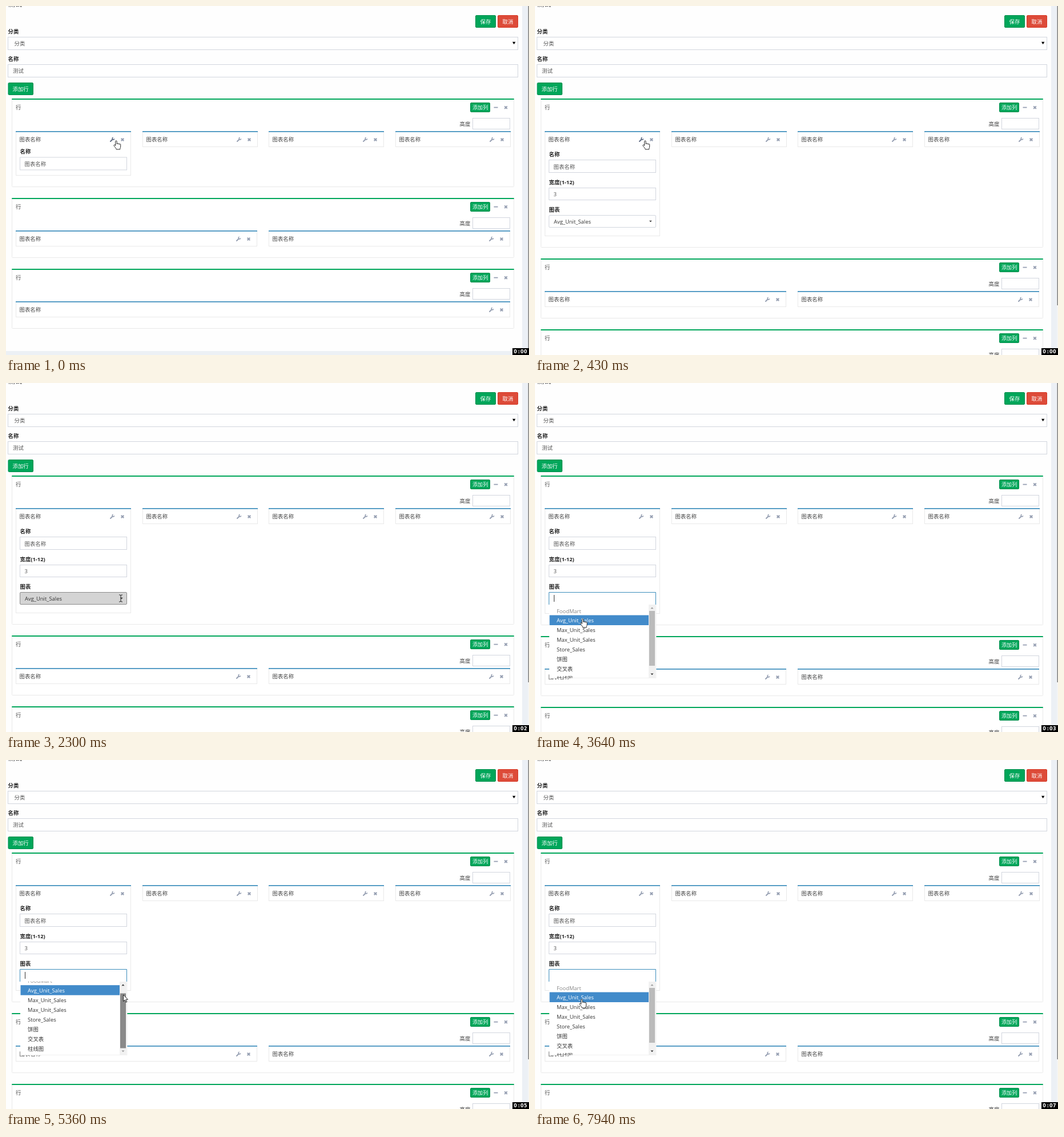
These frames come from a looping animation (916x611 px, 8 s). An HTML page:

```html
<!DOCTYPE html>
<html lang="zh">
<head>
<meta charset="utf-8">
<title>图表布局</title>
<style>
  html, body { margin: 0; width: 100%; height: 100%; overflow: hidden; background: #fff; }
  #stage { display: block; }
  text { font: 9.4px "Open Sans", "Noto Sans CJK SC", "Noto Sans CJK", sans-serif; fill: #444; white-space: pre; }
  .label { font-weight: 700; fill: #222; }
  .value { fill: #555; }
  .item { fill: #333; }
  .muted { fill: #888; }
  .light { fill: #fff; }
  .small { font-size: 9.1px; }
  .clock { font: 700 8px "DejaVu Sans", sans-serif; fill: #fff; }
  .tool { stroke: #97a0b3; fill: none; }
  .hot .tool { stroke: #606c84; }
  .field { fill: #fff; stroke: #d2d6de; }
  .panel { fill: #fff; stroke: #e9e9e9; }
</style>
</head>
<body>
<svg id="stage" width="916" height="611" viewBox="0 0 916 611"></svg>
<script>
const stage = document.getElementById('stage');

// Markup helpers; cy is the vertical middle of a text line.
const rect = (x, y, w, h, attrs) => `<rect x="${x}" y="${y}" width="${w}" height="${h}" ${attrs}/>`;
const text = (x, cy, s, cls = '') => `<text x="${x}" y="${cy + 3.5}" class="${cls}">${s}</text>`;
const field = (x, y, w, h, attrs = '') => rect(x, y, w, h, `class="field" ${attrs}`);
const button = (x, y, w, h, label, tx, fill = '#00a65a', edge = '#008d4c', cls = '') =>
  rect(x + .5, y + .5, w - 1, h - 1, `rx="1.5" fill="${fill}" stroke="${edge}"`) +
  text(tx, y + h / 2, label, 'light ' + cls);
const cross = (x, y) =>
  `<path class="tool" stroke-width="2" d="M${x - 2.3} ${y - 2.3}l4.6 4.6m0 -4.6l-4.6 4.6"/>`;
const wrench = (x, y, id = '') =>
  `<g ${id} transform="translate(${x} ${y})"><path class="tool" stroke-width="2" stroke-linecap="round" d="M-3 3L.8 -.8"/>
   <path class="tool" stroke-width="1.6" d="M3.7 -1.7A1.8 1.8 0 1 1 1.7 -3.7"/></g>`;

function column(x, y, w, first) {
  const r = x + w;
  return rect(x + .5, y + .5, w - 1, 27, `class="panel" ${first ? 'id="card"' : ''}`) +
    rect(x, y, w, 1.7, 'fill="#3c8dbc"') +
    text(x + 6.5, y + 14.5, '图表名称') +
    wrench(r - 33, y + 15, first ? 'id="wrench"' : '') + cross(r - 15, y + 15);
}

function row(id, y, count) {
  const gap = 20, w = (866 - gap * (count - 1)) / count;
  let s = `<g id="${id}" transform="translate(0 ${y})">` +
    rect(10.5, .5, 879, 104, 'class="panel" rx="1"') +
    rect(10, 0, 880, 2, 'rx="1" fill="#00a65a"') +
    text(17, 15, '行') +
    button(813, 7, 35, 17, '添加列', 817, undefined, undefined, 'small') +
    rect(854.5, 14.7, 7, 1.8, 'fill="#97a0b3"') + cross(875.5, 15.7) +
    text(794.5, 44, '高度') + field(817.5, 34.5, 65, 19);
  for (let i = 0; i < count; i++)
    s += column(Math.round(17 + i * (w + gap)), 57, Math.round(w), id === 'row1' && i === 0);
  return s + '</g>';
}

const names = ['Avg_Unit_Sales', 'Max_Unit_Sales', 'Max_Unit_Sales', 'Store_Sales', '饼图', '交叉表', '柱线图'];

stage.innerHTML =
  rect(0, 0, 916, 611, 'fill="#ecf0f5"') +
  rect(0, 0, 904, 604, 'id="page" fill="#fefefe"') +
  rect(914, 0, 2, 611, 'fill="#f4f4f4"') +
  rect(914.5, 0, 1.5, 611, 'id="bar" fill="#7f7f7f"') +
  '<text x="4" y="1" style="font-size:12px">测试</text>' +
  button(822, 16, 36, 22, '保存', 830.5) +
  button(861, 16, 36, 22, '取消', 869.5, '#dd4b39', '#d73925') +
  text(3.5, 44.5, '分类', 'label') + field(3.5, 54.5, 893, 22) +
  text(14.5, 65.5, '分类', 'value') + '<path d="M887 62.7h5.4l-2.7 4.6z"/>' +
  text(3.5, 92.5, '名称', 'label') + field(3.5, 102.5, 893, 22) + text(12, 113.5, '测试', 'value') +
  button(3.5, 134, 44.5, 22, '添加行', 11.5) +
  row('row1', 162, 4) +
  `<svg id="body" x="17" y="247" width="203" height="50"><g id="form"><g transform="translate(-17 -247)">
    ${text(24.5, 259.5, '名称', 'label')}${field(24.5, 269.5, 187, 22)}${text(32.5, 281, '图表名称', 'value')}
    ${text(24.5, 308.5, '宽度(1-12)', 'label')}${field(24.5, 318.5, 187, 21)}${text(32.5, 329, '3', 'value')}
    ${text(24.5, 356.5, '图表', 'label')}${field(24.5, 366.5, 187, 21, 'id="pick" rx="1.5"')}
    ${text(33, 377, 'Avg_Unit_Sales', 'item')}<path d="M200 375.7h4.8l-2.4 2.5z" fill="#333"/>
  </g></g></svg>` +
  row('row2', 336, 2) + row('row3', 460, 1) +
  `<g id="menu">
    ${rect(24.5, 366, 187.5, 23, 'fill="#fff"')}
    ${rect(25, 387, 187, 129.5, 'fill="#fff"')}
    <path d="M24.5 388V366.5H211.5V388" fill="none" stroke="#3c8dbc"/>
    <path d="M212 388V516.5H25" fill="none" stroke="#eee" stroke-width=".8"/>
    ${rect(33, 371, 1, 12, 'id="caret" fill="#333"')}
    <svg x="25" y="387.5" width="174" height="129"><g id="list"><g transform="translate(-25 -387.5)">
      ${text(38, 399, 'FoodMart', 'muted')}
      ${rect(25.5, 406.5, 173.5, 17.5, 'fill="#428bca"')}
      ${names.map((n, i) => text(38, 415.7 + 17 * i, n, i ? 'item' : 'light')).join('')}
    </g></g></svg>
    ${rect(199, 388, 12.5, 128, 'fill="#f1f1f1"')}
    ${rect(200, 399, 10, 96, 'id="thumb"')}
    <path id="up" d="M202.5 395.3h5l-2.5 -2.8z"/><path id="down" d="M202.5 508.5h5l-2.5 2.8z"/>
  </g>` +
  `<g stroke="#111" stroke-width=".9" fill="#fff" stroke-linejoin="round">
    <path id="hand" d="M-1.3 8.5V1.2a1.2 1.2 0 0 1 2.5 0V5.5a1.1 1.1 0 0 1 2.2 .3a1.1 1.1 0 0 1 2.2 .5a1.1 1.1 0 0 1 2.1 .8V10c0 2-1 2.5-1 5H.2C0 13-2 11.5-4 8.5a1.3 1.3 0 0 1 2.2-1.2z"/>
    <path id="arrow" d="M0 0V11.5L2.7 9 4.5 13.2 6.3 12.4 4.5 8.3H8z"/>
    <path id="beam" fill="none" d="M-3 -6h2l1 1 1 -1h2M0 -5V5M-3 6h2l1 -1 1 1h2"/>
  </g>` +
  rect(887, 599, 29, 12, 'fill="#000"') +
  '<text id="clock" class="clock" x="889.3 896.7 901 907" y="608">0:00</text>';

const el = {};
stage.querySelectorAll('[id]').forEach(n => el[n.id] = n);

// Pointer path: time, x, y, shape.
const path = [
  [0, 193, 236, 'hand'], [1560, 193, 236, 'arrow'], [1920, 199, 300, 'arrow'],
  [2080, 201, 365, 'beam'], [2200, 201, 377, 'beam'], [3300, 201, 377, 'arrow'],
  [3480, 120, 405, 'hand'], [3600, 83.5, 413, 'hand'], [3840, 83.5, 413, 'hand'],
  [4320, 95, 412, 'hand'], [4600, 95, 412, 'hand'], [4800, 185, 402, 'arrow'],
  [4920, 205.5, 401.5, 'arrow'], [5280, 205.5, 411, 'arrow'], [5400, 205.5, 411, 'arrow'],
  [5620, 205.5, 401.5, 'arrow'], [5740, 200, 392, 'arrow'], [6000, 160, 372, 'arrow'],
  [6340, 160, 372, 'arrow'], [6700, 140, 278, 'arrow'], [7080, 102.5, 396, 'arrow'],
  [7280, 102.5, 396, 'hand'], [7400, 92, 425, 'hand'], [7520, 92, 425, 'hand'],
  [7920, 82, 419, 'hand'], [8000, 82, 419, 'hand']
];
const scroll = [[0, 0], [4920, 0], [5280, 1], [5400, 1], [5620, 0], [8000, 0]];
const caretOn = [[2450, 2970], [3470, 3970], [4470, 5520], [6020, 6520], [7020, 7520]];

function sample(keys, t) {
  let i = 0;
  while (i < keys.length - 2 && t >= keys[i + 1][0]) i++;
  const a = keys[i], b = keys[i + 1], k = (t - a[0]) / (b[0] - a[0]);
  return a.slice(1).map((v, j) => typeof v === 'number' ? v + (b[j + 1] - v) * k : v);
}

const set = (id, attrs) => { for (const k in attrs) el[id].setAttribute(k, attrs[k]); };
const show = (id, on) => { el[id].style.display = on ? '' : 'none'; };
const move = (id, x, y) => set(id, { transform: `translate(${x} ${y})` });

function draw(t) {
  const tick = Math.floor(t / 120) * 120;
  const p = t < 120 ? .32 : t < 275 ? .68 : t < 430 ? .99 : 1;
  const open = t >= 2450;
  const grow = Math.round(156 * p) + (open ? 1 : 0);
  const dy = grow - 50;

  set('page', { height: 604 + dy });
  set('bar', { height: 611 - 87 * (p - .32) / .68 });
  set('card', { height: 27 + grow });
  el.row1.firstElementChild.setAttribute('height', 104 + grow);
  move('row2', 0, 336 + dy);
  move('row3', 0, 460 + dy);
  set('body', { height: grow });
  move('form', 0, -6.7 * (1 - p));

  const hover = t >= 2080 && !open, press = t >= 2210 && !open;
  el.pick.style.fill = press ? '#d4d4d4' : hover ? '#e6e6e6' : '';
  el.pick.style.stroke = press ? '#8c8c8c' : hover ? '#adadad' : '';
  set('wrench', { class: t < 1570 ? 'hot' : '' });

  show('menu', open);
  show('caret', caretOn.some(([a, b]) => t >= a && t < b));
  const [s] = sample(scroll, tick);
  move('list', 0, -12.3 * s);
  set('thumb', { y: 399 + 9.5 * s, fill: t >= 4920 && t < 5630 ? '#8a8a8a' : '#bbb' });
  set('up', { fill: s > 0 ? '#333' : '#999' });
  set('down', { fill: s < 1 ? '#333' : '#999' });

  const [x, y, shape] = sample(path, tick);
  for (const id of ['hand', 'arrow', 'beam']) {
    show(id, id === shape);
    move(id, x, y);
  }
  el.clock.textContent = '0:0' + Math.min(7, Math.floor((t + 110) / 1000));
}

const start = performance.now();
function frame() {
  draw((performance.now() - start) % 8000);
  requestAnimationFrame(frame);
}
frame();
</script>
</body>
</html>
```
